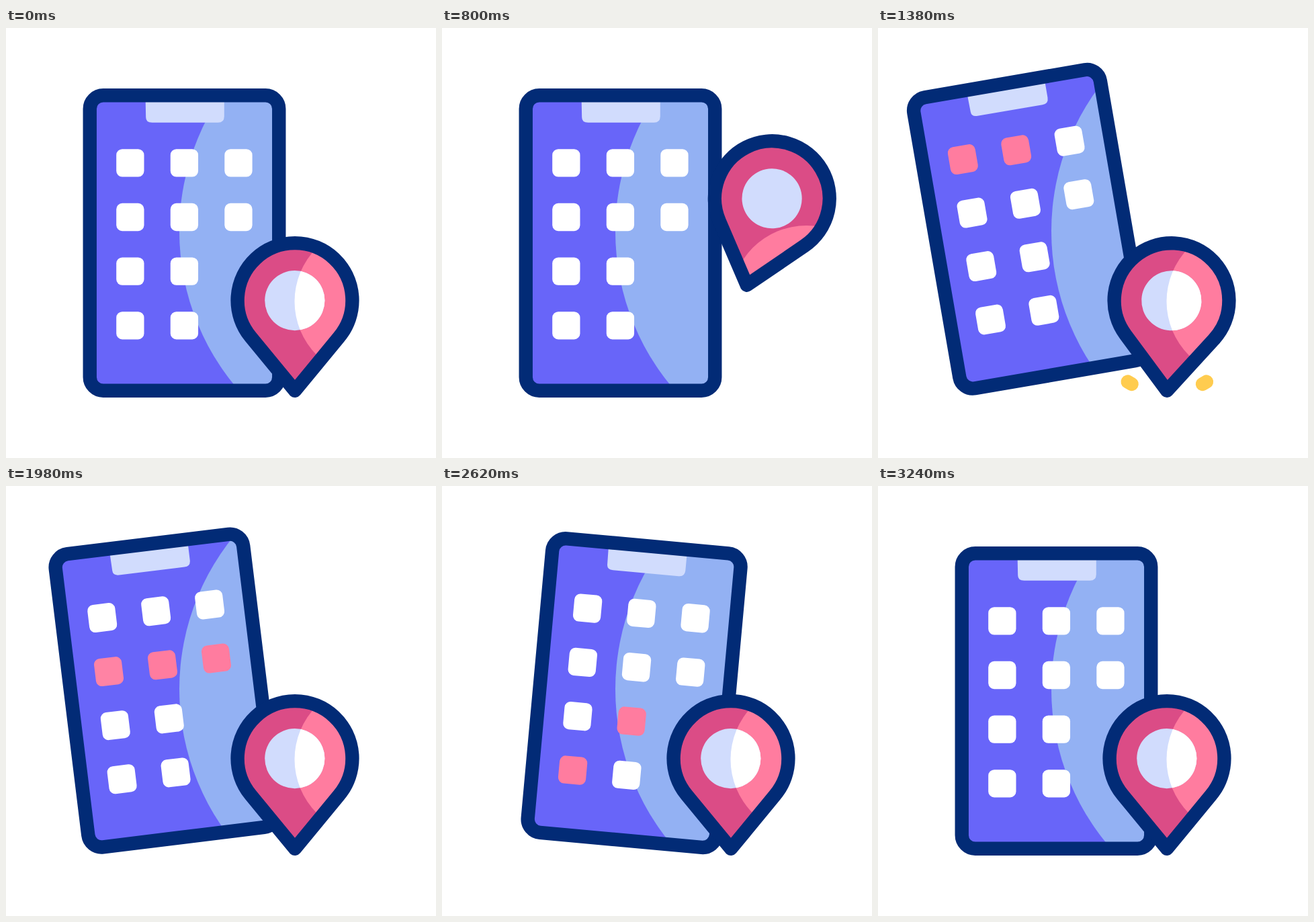
An HTML page that plays this animation: 640x640 px, repeating every 3600 ms.

```html
<!DOCTYPE html>
<html lang="en">
<head>
<meta charset="utf-8">
<title>Phone and map pin</title>
<style>
  html, body { margin: 0; width: 100%; height: 100%; overflow: hidden; background: #fff; }
  svg { display: block; width: 100vw; height: 100vh; }
  .line { fill: none; stroke: #022b76; stroke-width: 20.4; stroke-linejoin: round; }
  .spark { stroke: #ffcc4f; stroke-linecap: round; }
</style>
</head>
<body>
<svg viewBox="0 0 640 640">
  <defs>
    <rect id="body" x="124.75" y="100.3" width="281.5" height="439.4" rx="20"/>
    <path id="drop" d="M430 539.8L364.1 459.8A85.4 85.4 0 1 1 495.9 459.8Z"/>
    <circle id="hole" cx="429.8" cy="405.6" r="44.6"/>
    <clipPath id="bodyClip"><use href="#body" class="phone"/></clipPath>
    <clipPath id="dropClip"><use href="#drop" class="pin"/></clipPath>
    <clipPath id="holeClip"><use href="#hole" class="pin"/></clipPath>
  </defs>

  <use href="#body" class="phone" fill="#6865f9"/>
  <!-- the highlights stay still while the shapes move through them -->
  <g clip-path="url(#bodyClip)"><circle cx="619.5" cy="302.5" r="361.5" fill="#93b1f3"/></g>
  <g class="phone">
    <path d="M207.6 105H324.8V131.5Q324.8 140.8 315.5 140.8H217.5Q208.2 140.8 208.2 133Z" fill="#d1dcfd"/>
    <use href="#body" class="line"/>
    <g id="apps"></g>
  </g>

  <line class="spark"/>
  <line class="spark"/>

  <use href="#drop" class="pin" fill="#db4c86"/>
  <g clip-path="url(#dropClip)"><circle cx="542.5" cy="407" r="113" fill="#ff7c9f"/></g>
  <g class="pin">
    <use href="#drop" class="line"/>
    <use href="#hole" fill="#d1dcfd"/>
  </g>
  <g clip-path="url(#holeClip)"><circle cx="542.5" cy="407" r="113" fill="#fff"/></g>
</svg>
<script>
const LOOP = 3600, STEP = 20;
const all = s => [...document.querySelectorAll(s)];
const clamp = v => Math.min(1, Math.max(0, v));

function bezier(x1, y1, x2, y2) {
  const at = (a, b, s) => 3 * (1 - s) ** 2 * s * a + 3 * (1 - s) * s * s * b + s ** 3;
  return x => {
    let lo = 0, hi = 1;
    for (let i = 0; i < 24; i++) {
      const mid = (lo + hi) / 2;
      if (at(x1, x2, mid) < x) lo = mid; else hi = mid;
    }
    return at(y1, y2, lo);
  };
}
const rise = p => u => 1 - (1 - u) ** p;
const fall = p => u => u ** p;
const smooth = bezier(.35, 0, .65, 1);
const soft = bezier(.3, 0, .5, 1);

// each key: time, value, easing into it
function track(keys, t) {
  let [t0, v0] = keys[0];
  for (const [t1, v1, ease] of keys.slice(1)) {
    if (t < t1) return t <= t0 ? v0 : v0 + (v1 - v0) * ease((t - t0) / (t1 - t0));
    t0 = t1; v0 = v1;
  }
  return v0;
}

const pinX = [[0, 0], [620, 28.4, soft], [1085, 0, fall(1.9)]];
const pinY = [[0, 0], [620, -255, bezier(.3, 0, .25, 1)], [1040, 1, bezier(.4, 0, .6, 1)], [1080, 0, smooth]];
const pinTurn = [[0, 0], [620, 29, soft], [1070, -7.6, smooth], [1300, 6.2, smooth],
  [1500, -3, smooth], [1620, 0, smooth]];
const phoneTurn = [[1080, 0], [1630, -12, bezier(.2, 0, .3, 1)], [2160, 0, fall(2.1)],
  [2440, 8, rise(2.2)], [2715, 0, fall(2.5)], [2975, -5, rise(2.2)], [3240, 0, fall(2.2)]];

const apps = [];
for (let i = 0; i < 10; i++) {
  const col = i < 6 ? i % 3 : i % 2;
  const row = i < 6 ? Math.floor(i / 3) : i / 2 - 1 | 0;
  const app = document.createElementNS("http://www.w3.org/2000/svg", "rect");
  const spec = { x: 164.2 + col * 80.55, y: 180.2 + row * 80.65, width: 41.3, height: 41.3, rx: 8.8 };
  for (const k in spec) app.setAttribute(k, spec[k]);
  document.getElementById("apps").append(app);
  apps.push(app);
}

const phoneParts = all(".phone"), pinParts = all(".pin"), sparks = all(".spark");

function appColor(age) {
  const k = clamp(age / 30) * clamp((425 - age) / 35);
  return `rgb(255,${255 - 131 * k},${255 - 96 * k})`;
}

function drawSparks(t) {
  const on = t >= 1080 && t < 1640;
  const head = 34.6 * rise(2)(clamp((t - 1060) / 230));
  const tail = 34.6 * clamp((t - 1140) / 300);
  const width = 20.4 * clamp((1640 - t) / 200);
  sparks.forEach((spark, i) => {
    const side = i ? 1 : -1;
    const end = (n, d) => {
      spark.setAttribute("x" + n, 430.3 + side * (28.7 + d * .866));
      spark.setAttribute("y" + n, 543.8 - d * .5);
    };
    end(1, tail);
    end(2, head);
    spark.setAttribute("stroke-width", width);
    spark.setAttribute("visibility", on ? "visible" : "hidden");
  });
}

function draw(t) {
  const tilt = track(phoneTurn, t);
  // the phone rocks on whichever bottom corner it leans towards
  const corner = tilt < 0 ? 124.75 : 406.25;
  const lean = `rotate(${tilt} ${corner} 539.7)`;
  const fly = `translate(${track(pinX, t)} ${track(pinY, t)}) rotate(${track(pinTurn, t)} 430 539.8)`;
  phoneParts.forEach(e => e.setAttribute("transform", lean));
  pinParts.forEach(e => e.setAttribute("transform", fly));
  apps.forEach((app, i) => app.setAttribute("fill", appColor(t - 1060 - 176 * i)));
  drawSparks(t);
}

const start = performance.now();
function tick() {
  const t = (performance.now() - start) % LOOP;
  draw(Math.floor(t / STEP) * STEP);
  requestAnimationFrame(tick);
}
draw(0);
requestAnimationFrame(tick);
</script>
</body>
</html>
```
